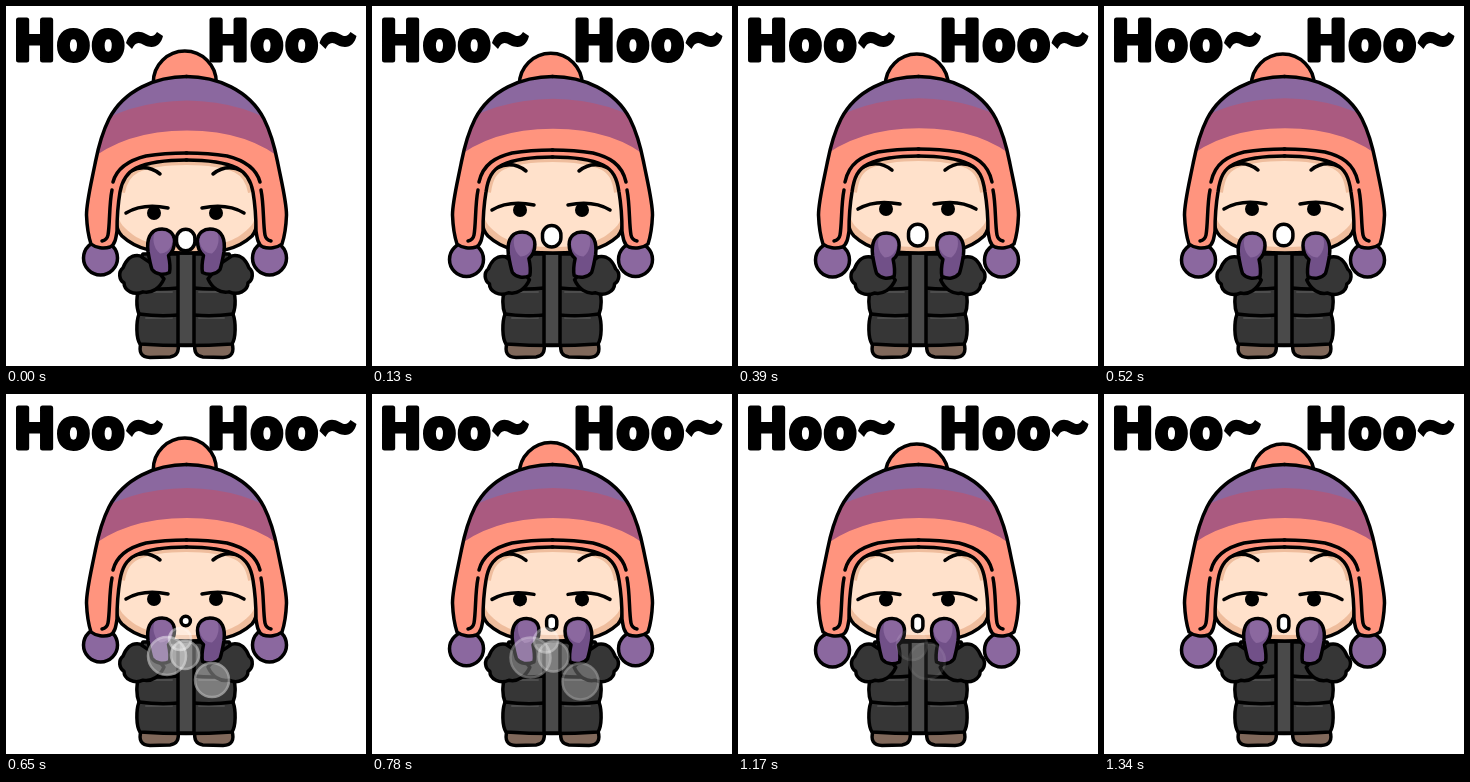
These frames come from a looping animation (360 px wide and 360 px high, 1470 ms). An HTML page:

```html
<!DOCTYPE html>
<html lang="en">
<head>
<meta charset="utf-8">
<title>Warm breath</title>
<style>
  html, body { margin: 0; width: 100%; height: 100%; overflow: hidden; background: #fff; }
  svg { display: block; width: 100vw; height: 100vh; }
  .ink { stroke: #000; stroke-width: 3.5; stroke-linecap: round; stroke-linejoin: round; }
  .line { fill: none; }
  .coat { fill: #363636; }
  .wool { fill: #8b689f; }
  .flip { transform: matrix(-1, 0, 0, 1, 361, 0); }
  .seam { fill: none; stroke: #4d4d4d; stroke-width: 2; stroke-linecap: round; }
  .shout { font: 700 55.5px Roboto, Inter, sans-serif; letter-spacing: 3.4px;
           stroke: #000; stroke-width: 5; stroke-linejoin: round; }
</style>
</head>
<body>
<svg viewBox="0 0 360 360">
  <defs>
    <g id="hoo">
      <text class="shout" x="9" y="54">Hoo</text>
      <path d="M120 37C123 27 131 23 140 28C145 31 148 31 151 26L157 30C155 39 148 44 138 39C132 35 129 37 126 43Z"/>
    </g>
    <path id="shoe" class="ink" fill="#80685a" d="M135 337Q131 351 144 351.5L164 351Q174 350 172 337Z"/>
    <path id="sleeve" class="ink coat"
      d="M134 250C123 248 119 257 117 262C112 266 113 274 118 277C118 285 128 290 137 286C146 288 154 282 158 273L146 258Z"/>
    <g id="arm">
      <use href="#sleeve"/>
      <g class="hand">
        <path class="ink" fill="#715088" d="M146 264C144 258 143 252 142 246C140.5 234 144 225 153 223.8C162 222.5 168.5 227 168.5 236C168.5 243 166 247 162.5 250C164 257 164.5 262 163.5 267C157 270 150 269 146 264Z"/>
        <path class="wool" d="M149 227C158 223 167 228 166.5 236C165 244 160 248 154 248C147 243 146 231 149 227Z"/>
      </g>
    </g>
    <g id="eye">
      <circle cx="148" cy="205" r="7"/>
      <path class="ink line" d="M120 205Q137 195 162 200"/>
    </g>
    <path id="brow" class="ink line" d="M125 163Q140 155 154 166"/>
    <path id="halfHat"/>
    <path id="halfArc"/>
    <path id="halfRim"/>
    <path id="stitch" d="M106 184C103 199 104 218 102 229Q101 234 96 235"/>
    <clipPath id="hatClip"><use href="#halfHat"/><use href="#halfHat" class="flip"/></clipPath>
  </defs>

  <use href="#hoo"/>
  <use href="#hoo" x="193.5"/>

  <use href="#shoe"/>
  <use href="#shoe" class="flip"/>
  <path class="ink coat" d="M137 248C131 258 131 272 134 282C130 288 130 301 133 308C130 316 130 332 134 338Q180 341 226 338C230 332 230 316 227 308C230 301 230 288 226 282C229 272 229 258 223 248Z"/>
  <path class="seam" d="M140 286H166M193 286H218M140 312H166M193 312H218"/>
  <path class="ink line" d="M134 282Q154 284 172 282M188 282Q206 284 226 282M133 308Q154 311 172 309M188 309Q206 311 227 308"/>
  <path class="ink" fill="#4a4a4a" d="M172 247H188V339H172Z"/>

  <g id="bobbles" class="ink wool">
    <circle cx="94.5" r="17"/>
    <circle cx="263.5" r="17"/>
  </g>
  <circle id="pom" class="ink" fill="#ff947e" cx="178.8" r="31.5"/>

  <path class="ink" fill="#efbd9d" d="M113 140V190C109 206 108 222 116 230C130 243 147 247 181 247C215 247 232 243 246 230C253 222 252 206 249 190V140Z"/>
  <path fill="#ffe1cb" d="M114 140V190C110 206 112 216 119 222C133 236 150 241 181 241C212 241 229 236 243 222C250 216 251 206 248 190V140Z"/>
  <g class="line" stroke="#efbd9d" stroke-width="10">
    <use href="#halfRim"/><use href="#halfRim" class="flip"/>
  </g>
  <g id="face">
    <use href="#brow"/>
    <use href="#brow" class="flip"/>
    <use href="#eye"/>
    <use href="#eye" transform="matrix(-1 0 0 1 358 0)"/>
  </g>
  <rect id="mouth" class="ink" fill="#fff"/>

  <g clip-path="url(#hatClip)">
    <path fill="#ff947e" d="M70 60H290V260H70Z"/>
    <g id="bands">
      <path fill="#aa5a80" d="M70 40H290V166Q252 124 181 124Q110 124 70 166Z"/>
      <path class="wool" d="M70 40H290V132Q248 95 181 94Q114 95 70 132Z"/>
    </g>
  </g>
  <g class="ink line">
    <use href="#halfHat"/><use href="#halfHat" class="flip"/>
    <use href="#halfArc"/><use href="#halfArc" class="flip"/>
    <use href="#stitch"/><use href="#stitch" class="flip"/>
  </g>

  <use href="#arm"/>
  <use href="#arm" transform="matrix(-1 0 0 1 360 0)"/>
  <g id="breath" fill="#fff" fill-opacity="0.62" stroke="#fff" stroke-opacity="0.8" stroke-width="2.5"></g>
</svg>
<script>
const $ = id => document.getElementById(id);
const set = (el, attrs) => { for (const k in attrs) el.setAttribute(k, attrs[k]); };
const move = (x, y) => ({ transform: `translate(${x} ${y})` });

const LOOP = 1470, STEP = 130, LAST = 10, BLOW = 5;

// Each phase settles from u = 0 to u = 1
const inhale = u => ({
  pom: 45 + 3 * u, bob: 252 + 2 * u, face: 2 - 4 * u, rim: 1 - 4 * u,
  hand: [-7.5 * u, 4 * u - 0.5], lips: [234 - 5 * u, 9.2, 10.8]
});
const exhale = u => ({
  pom: 44 + 6 * u, bob: 251 + 5 * u, face: 0.5 * u, rim: 0,
  hand: [-2 * u, 0.5 + 0.5 * u], lips: [227 + 2.5 * u, 4.7 + 0.5 * u, 4.7 + 3.3 * u]
});

const puffs = [[161, 262, 19], [206, 286, 17], [179, 261, 14], [174, 245, 11]].map(([x, y, r], i) => {
  const el = document.createElementNS("http://www.w3.org/2000/svg", "circle");
  $("breath").append(el);
  return { el, x, y, r, life: i < 2 ? 3.7 : 5.3 };
});

// The brim edge and the seam above it rise and fall with d
function drawHat(d) {
  const rim = `C116 ${174 + d} 120 ${166 + d} 130 ${161 + d}C145 ${154 + d} 165 ${153 + d} 181 ${153 + d}`;
  set($("halfRim"), { d: "M114 186" + rim });
  set($("halfHat"), { d: `M181 70.5C150 70.5 118 84 103 113C94 131 91 148 89 158C85 178 80.5 196 80.5 209
    C81 222 83 232 85 238C90 242 98 243 104 241C109 239 110 232 111 225C111 205 113 192 114 186` + rim });
  set($("halfArc"), { d: `M107 176C111 ${160 + d} 124 ${153 + d} 140 ${149 + d}Q158 ${146 + d} 181 ${146 + d}` });
}

function draw(n) {
  const age = n < BLOW ? n : n - BLOW;
  const u = 1 - 0.25 ** age;
  const p = (n < BLOW ? inhale : exhale)(u);

  set($("pom"), { cy: p.pom + 31.5 });
  for (const c of $("bobbles").children) set(c, { cy: p.bob });
  set($("face"), move(0, p.face));
  set($("bands"), move(0, p.rim * 0.6));
  drawHat(p.rim);

  const [y, rx, ry] = p.lips;
  set($("mouth"), { x: 179.7 - rx, y: y - ry, width: 2 * rx, height: 2 * ry, rx });
  set(document.querySelector(".hand"), move(...p.hand));
  set($("sleeve"), move(p.hand[0] * 0.1, p.hand[1] * 0.3));

  for (const { el, x, y, r, life } of puffs) {
    const on = n >= BLOW && n < LAST;
    const k = age / 2;
    set(el, {
      cx: x + 5 * Math.sign(x - 174) * k, cy: y + 3 * k, r: r + 2 * k,
      opacity: on ? Math.max(0, 0.56 * (1 - age / life)) : 0
    });
  }
}

let begin, shown;
function tick(now) {
  begin ??= now;
  const t = (now - begin) % LOOP;
  // the step before the last is held a little longer
  const n = t >= 1340 ? LAST : Math.min(LAST - 1, Math.floor(t / STEP));
  if (n !== shown) draw(shown = n);
  requestAnimationFrame(tick);
}
draw(0);
requestAnimationFrame(tick);
</script>
</body>
</html>
```
